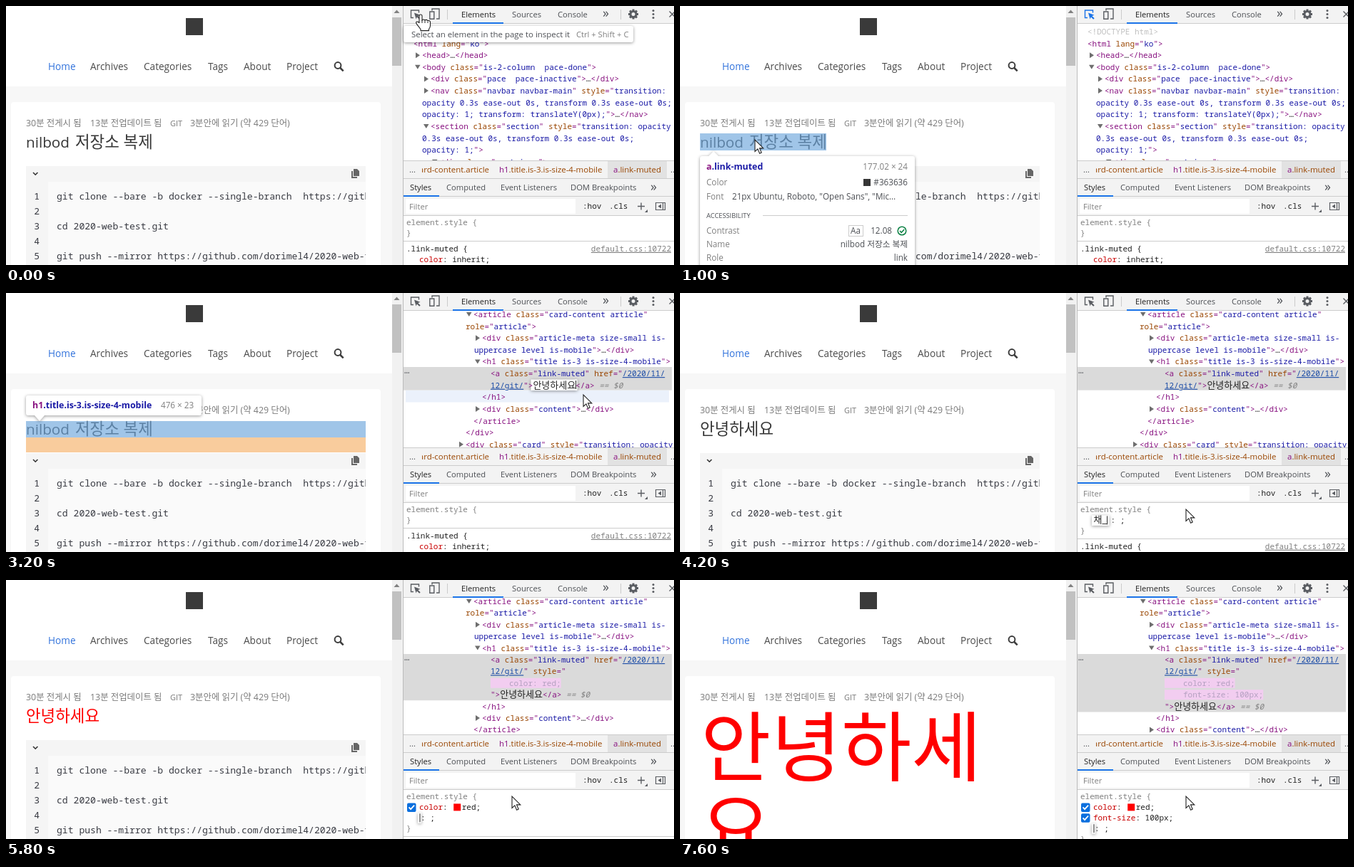
Write an HTML page that moves like this. It is 936 px wide and 364 px high and loops after 7800 ms.

```html
<!DOCTYPE html>
<html lang="ko">
<head>
<meta charset="utf-8">
<title>Inspecting and editing an element</title>
<style>
html, body { margin: 0; width: 100%; height: 100%; overflow: hidden; background: #fff; }
#stage { display: block; width: 936px; height: 364px; }
text { font: 11.2px 'Open Sans', 'Noto Sans CJK KR', 'Noto Sans CJK', sans-serif; fill: #4c4f54; white-space: pre; }
.nav { font-size: 13.6px; fill: #4a4a4a; }
.meta { font-size: 12.4px; fill: #7a7a7a; }
.title { font-size: 22.4px; fill: #363636; }
.latin { font-size: 20.7px; fill: #363636; }
.code { font: 13.08px 'Noto Sans Mono', 'DejaVu Sans Mono', monospace; fill: #383a42; }
.mono { font: 11px 'Noto Sans Mono', 'Noto Sans CJK KR', 'Noto Sans CJK', monospace; fill: #222; }
.crumb { font-size: 11.45px; }
.tip { font-size: 11.7px; }
.bold { font-size: 12.4px; font-weight: 700; }
.dim { fill: #808080; }
.end { text-anchor: end; }
.t { fill: #881280; } .a { fill: #994500; } .v { fill: #1a1aa6; } .x { fill: #222; }
.l { fill: #1a4ba6; text-decoration: underline; }
.g { fill: #808080; font-style: italic; }
.d { fill: #c0c0c0; }
.k { font-size: 13px; }
.p { fill: #b4a0c0; }
.r { fill: #c80000; }
.shadow { filter: drop-shadow(0 1px 2px rgba(0, 0, 0, .4)); }
</style>
</head>
<body>
<svg id="stage" viewBox="0 0 936 364"></svg>
<script>
const LOOP = 7800, STEP = 200;
const WHITE = '#fff', TINT = '#f7f7f7', BAR = '#f3f3f3', EDGE = '#ccc', INK = '#5a5d62', BLUE = '#1a73e8';
const BRAND = 'nilbod', TOPIC = '저장소 복제', HELLO = '안녕하세요';
const stage = document.getElementById('stage');

const esc = s => String(s).replace(/&/g, '&amp;').replace(/</g, '&lt;');
const text = (x, y, s, cls = '', extra = '') => `<text x="${x}" y="${y}" class="${cls}" ${extra}>${esc(s)}</text>`;
const rich = (x, y, html, cls) => `<text x="${x}" y="${y}" class="${cls}">${html}</text>`;
const span = (cls, s) => `<tspan class="${cls}">${esc(s)}</tspan>`;
const box = (x, y, w, h, fill, extra = '') => `<rect x="${x}" y="${y}" width="${w}" height="${h}" fill="${fill}" ${extra}/>`;
const fill = (d, color, extra = '') => `<path d="${d}" fill="${color}" ${extra}/>`;
const line = (d, color = INK, w = 1, extra = '') => `<path d="${d}" fill="none" stroke="${color}" stroke-width="${w}" ${extra}/>`;
const clip = (x, y, w, h, s) => `<svg x="${x}" y="${y}" width="${w}" height="${h}" viewBox="${x} ${y} ${w} ${h}">${s}</svg>`;
const wide = c => c.charCodeAt(0) > 0x1100 && c !== '…';
const monoWidth = s => [...s].reduce((w, c) => w + (wide(c) ? 12 : 6.6), 0);
const upTo = (list, step) => list.reduce((v, e) => e[0] <= step ? e[1] : v, null);

// Timeline, counted in 200 ms steps
const pointer = [[0, 581, 12], [1, 581, 12], [2, 380, 90], [3, 183, 164], [4, 140, 180], [5, 105, 188],
  [7, 105, 188], [8, 430, 160], [9, 770, 125], [10, 770, 125], [11, 809, 143], [16, 809, 143],
  [17, 760, 220], [18, 709, 304], [39, 709, 304]];
const hovers = [[0, ''], [3, 'card'], [5, 'link'], [7, ''], [9, 'row'], [11, 'h1'], [17, '']];
const edits = [[0, null], [19, ['']], [21, ['채_']], [22, ['c']], [23, ['color']], [24, ['color', '']],
  [25, ['color', 'red']], [27, ['']], [31, ['f']], [32, ['font']], [33, ['font-size']],
  [34, ['font-size', '']], [35, ['font-size', '1']], [36, ['font-size', '100']],
  [37, ['font-size', '100px']], [38, ['']]];

function stateAt(step) {
  const i = Math.max(1, pointer.findIndex(p => p[0] >= step));
  const [a, b] = [pointer[i - 1], pointer[i]];
  const u = (step - a[0]) / (b[0] - a[0]);
  const decls = [['color', 'red'], ['font-size', '100px']];
  return {
    step,
    x: a[1] + (b[1] - a[1]) * u,
    y: a[2] + (b[2] - a[2]) * u,
    hover: upTo(hovers, step),
    edit: upTo(edits, step),
    picking: step >= 1 && step < 7,
    found: step >= 7,
    typing: step >= 10 && step < 18,
    label: step < 11 ? `${BRAND} ${TOPIC}` : HELLO.slice(0, step - 11),
    renamed: step >= 18,
    live: decls.slice(0, step >= 37 ? 2 : step >= 25 ? 1 : 0),
    saved: decls.slice(0, step >= 38 ? 2 : step >= 27 ? 1 : 0)
  };
}

// Web page

function title(s) {
  const color = s.live.length ? 'style="fill:#f00"' : '';
  if (s.live.length > 1) {
    const big = 'style="fill:#f00;font-size:107px"';
    return text(29, 274, HELLO.slice(0, 4), '', big) + text(29, 389, HELLO[4], '', big);
  }
  return s.renamed ? text(28, 199, HELLO, 'title', color)
    : text(28, 199, BRAND, 'latin') + text(97, 199, TOPIC, 'title');
}

function codeBlock() {
  const url = 'https://github.com/dorimel4/2020-web-test.git';
  const rows = [`git clone --bare -b docker --single-branch  ${url}`, '', 'cd 2020-web-test.git', '', `git push --mirror ${url}`];
  return box(28, 225, 476, 140, '#f5f5f5') + box(59, 247, 445, 118, '#fafafa') +
    line('M38 234l3.2 3.2l3.2-3.2', '#333', 1.6) +
    fill('M487 229h5l3 3v7h-8zM484 232h2v8h6v2h-8z', '#666') +
    clip(28, 247, 476, 117, rows.map((r, i) =>
      text(47, 272 + 21 * i, i + 1, 'code end') + text(71, 272 + 21 * i, r, 'code')).join(''));
}

function page(s) {
  const nav = [[59, 'Home'], [118, 'Archives'], [193, 'Categories'], [283, 'Tags'], [333, 'About'], [393, 'Project']];
  return box(0, 0, 541, 114, WHITE) + box(0, 113, 541, 251, TINT) +
    box(252, 17, 24, 24, '#3a3a3a') +
    nav.map(([x, n], i) => text(x, 90, n, 'nav', i ? '' : 'style="fill:#3273dc"')).join('') +
    '<circle cx="465" cy="83.5" r="4.4" fill="none" stroke="#3c3c3c" stroke-width="2"/>' + line('M468.3 87l4.4 4.4', '#3c3c3c', 2.5) +
    box(7, 135, 518, 240, WHITE, 'rx="4"') +
    text(28, 169, '30분 전게시 됨', 'meta') + text(118, 169, '13분 전업데이트 됨', 'meta') +
    text(230, 169, 'GIT', 'meta', 'style="font-size:11px"') + text(258, 169, '3분안에 읽기 (약 429 단어)', 'meta') +
    (s.live.length > 1 ? '' : codeBlock()) + title(s) +
    box(541, 0, 15, 364, '#f1f1f1') + box(541, 16, 13, 68, '#c1c1c1') + fill('M543.5 10l4-4.5l4 4.5z', '#808080');
}

function smallTip(tag, rest, size, w, sizeX) {
  return fill(`M31 144h${w - 6}q3 0 3 3v22q0 3-3 3H54l-7 8l-7-8H31q-3 0-3-3v-22q0-3 3-3z`, WHITE, 'class="shadow"') +
    rich(37, 162, span('t', tag) + span('v', rest), 'bold') + text(sizeX, 162, size, 'tip dim');
}

function linkTip() {
  const label = (y, k) => text(37, y, k, 'tip dim');
  const value = (y, v) => text(319, y, v, 'tip end');
  return fill('M31 211h9l7-7l7 7h272q3 0 3 3v160H28V214q0-3 3-3z', WHITE, 'class="shadow"') +
    rich(37, 230, span('t', 'a') + span('v', '.link-muted'), 'bold') + text(319, 230, '177.02 × 24', 'tip dim end') +
    label(252, 'Color') + box(257, 243, 10, 10, '#363636') + value(252, '#363636') +
    label(272, 'Font') + text(73, 272, '21px Ubuntu, Roboto, "Open Sans", "Mic…', 'tip') +
    text(37, 298, 'ACCESSIBILITY', '', 'style="font-size:9.3px"') + line('M116 294.5H319', EDGE) +
    label(320, 'Contrast') + box(236.5, 308.5, 20, 15, 'none', `stroke="${EDGE}"`) + text(239, 320, 'Aa', 'tip') +
    text(297, 320, '12.08', 'tip end') +
    '<circle cx="311" cy="316" r="5.8" fill="none" stroke="#0b8043" stroke-width="1.5"/>' + line('M308 316l2.2 2.3l4-4.4', '#0b8043', 1.5) +
    label(339, 'Name') + value(339, `${BRAND} ${TOPIC}`) + label(358, 'Role') + value(358, 'link');
}

function highlight(kind) {
  const inner = 'rgba(111,168,220,.66)';
  const link = box(28, 179, 177, 24, inner);
  switch (kind) {
    case 'card': return fill('M7 135H525V364H504V155H28V364H7z', 'rgba(147,196,125,.55)') + box(28, 155, 476, 209, inner);
    case 'link': return link + linkTip();
    case 'row': return link + smallTip('a', '.link-muted', '177.02 × 24', 162, 118);
    case 'h1': return box(28, 180, 476, 23, inner) + box(28, 203, 476, 21, 'rgba(246,178,107,.66)') +
      smallTip('h1', '.title.is-3.is-size-4-mobile', '476 × 23', 246, 217);
  }
  return '';
}

// Element tree

function painter() {
  let quoted = false, inTag = false, naming = false, link = false;
  const kind = (c, before) => {
    if (quoted) {
      if (c !== '"') return link ? 'l' : 'v';
      quoted = false;
      return 't';
    }
    if (c === '<') { inTag = naming = true; return 't'; }
    if (c === '>') { inTag = false; return 't'; }
    if (!inTag) return /[=$0]/.test(c) ? 'g' : wide(c) ? 'x k' : 'x';
    if (c === '"') { quoted = true; link = before.endsWith('href='); return 't'; }
    if (c === ' ') naming = false;
    return naming || c === '=' ? 't' : 'a';
  };
  return s => {
    const runs = [];
    [...s].forEach((c, i) => {
      const k = kind(c, s.slice(0, i)), last = runs[runs.length - 1];
      if (last && last[0] === k) last[1] += c; else runs.push([k, c]);
    });
    return runs.map(r => span(...r)).join('');
  };
}

const headRows = [
  [571, '', ''], [571, '<html lang="ko">', ''], [583, '<head>…</head>', 'shut'],
  [583, '<body class="is-2-column  pace-done">', 'open'], [595, '<div class="pace  pace-inactive">…</div>', 'shut'],
  [595, '<nav class="navbar navbar-main" style="transition:', 'shut'],
  [583, 'opacity 0.3s ease-out 0s, transform 0.3s ease-out 0s;'],
  [583, 'opacity: 1; transform: translateY(0px);">…</nav>'],
  [595, '<section class="section" style="transition: opacity', 'open'],
  [583, '0.3s ease-out 0s, transform 0.3s ease-out 0s;'], [583, 'opacity: 1;">'],
  [607, '<div class="container">', 'open']];

function articleRows(s) {
  const tail = `">${s.label}</a> == $0`;
  const link = s.live.length
    ? [[679, '12/git/" style="'], ...s.live.map(d => [705, d.join(': ') + ';', 'pink']), [679, tail]]
    : [[679, '12/git/' + tail]];
  return [[655, '<article class="card-content article"', 'open'], [644, 'role="article">'],
    [667, '<div class="article-meta size-small is-', 'shut'], [656, 'uppercase level is-mobile">…</div>'],
    [667, '<h1 class="title is-3 is-size-4-mobile">', 'open'], [679, '<a class="link-muted" href="/2020/11/'],
    ...link, [667, '</h1>'], [667, '<div class="content">…</div>', 'shut'], [655, '</article>'], [644, '</div>'],
    [644, '<div class="card" style="transition: opacity', 'shut']];
}

function arrow(x, y, mark) {
  if (mark === 'open') return fill(`M${x - 10} ${y - 3}h7.5l-3.7 6z`, '#6e6e6e');
  return mark === 'shut' ? fill(`M${x - 9} ${y - 4}v8l6-4z`, '#6e6e6e') : '';
}

function tree(s) {
  const rows = s.found ? articleRows(s) : headRows;
  const top = s.found ? 30 : 36, pitch = s.live.length ? 16.4 : 16.62;
  const paint = painter();
  let out = box(557, 25, 379, 192, WHITE);
  if (s.found) {
    const n = s.live.length;
    out += box(557, 104, 376, (n ? n + 3 : 2) * 16.3, '#dadada') + text(558, 115, '•••', '', 'style="font-size:6.5px"');
    if (s.hover === 'h1') out += box(560, 137, 369, 16.5, '#ebf1fb');
    if (s.typing) {
      const w = monoWidth(s.label);
      out += box(735.5, 121.5, w + 5, 15.5, WHITE, 'class="shadow"');
      out += s.step === 10 ? box(738, 123, w, 13, '#b4d5fe') : line(`M${738.5 + w} 123v12`, '#222');
    }
  } else out += text(571, 40, '<!DOCTYPE html>', 'mono d');
  rows.forEach(([x, str, mark], i) => {
    const y = top + pitch * i;
    if (mark === 'pink') {
      out += box(679, y - 7, x - 679 + monoWidth(str), 14, '#f2cdf0') + text(x, y + 4, str, 'mono p');
    } else out += arrow(x, y, mark) + rich(x, y + 4, paint(str), 'mono');
  });
  return clip(557, 25, 379, 192, out);
}

// Style rules

function checkbox(y) {
  return box(562, y - 6, 12.5, 12.5, '#0b6fde', 'rx="2"') + line(`M564.5 ${y}l2.6 2.8l5-5.6`, '#fff', 1.8);
}

function declaration([name, value], y) {
  const isColor = name === 'color', x = 579 + monoWidth(name + ': ');
  return checkbox(y) + rich(579, y + 4, span('r', name) + ': ', 'mono') +
    (isColor ? box(x + 2, y - 5, 10, 10, '#f00') : '') + text(x + (isColor ? 13.5 : 0), y + 4, value + ';', 'mono');
}

function editor([name, value], y) {
  const field = (x, s) => {
    const w = monoWidth(s);
    return box(x - 2.5, y - 7, w + (w ? 6 : 5), 14.5, WHITE, 'class="shadow"') +
      rich(x, y + 4, [...s].map(c => span(wide(c) ? 'k' : '', c)).join(''), 'mono') + line(`M${x + w + .5} ${y - 6}v12`, '#222');
  };
  if (value === undefined) {
    const w = monoWidth(name);
    return field(579.5, name) + text(580 + w + (w ? 5 : 1), y + 4, ': ;', 'mono');
  }
  const x = 579 + monoWidth(name + ': ');
  return rich(579, y + 4, span('r', name) + ':', 'mono') + field(x, value) + text(x + monoWidth(value) + 4, y + 4, ';', 'mono');
}

function rules(s) {
  let y = 304.5, out = text(561, 308, 'element.style {', 'mono dim');
  const next = () => y += 14.9;
  s.saved.forEach(d => out += declaration(d, next()));
  if (s.edit) out += editor(s.edit, next());
  out += text(561, next() + 4, '}', 'mono dim');
  y += 11;
  out += line(`M557 ${Math.round(y) + .5}H936`, EDGE);
  y += 10.5;
  return out + text(561, y + 4, '.link-muted {', 'mono') +
    text(932, y + 4, 'default.css:10722', 'mono dim end', 'text-decoration="underline"') +
    rich(579, y + 19, span('r', 'color') + ': inherit;', 'mono');
}

// Developer panel frame

function toolbar(s) {
  const pick = s.picking ? BLUE : INK;
  const teeth = Array.from({ length: 8 }, (_, i) => box(-1.5, -7, 3, 4, INK, `transform="translate(879 11.5) rotate(${i * 45})"`)).join('');
  return box(557, 0, 379, 25, BAR) + line('M557 24.5H936', EDGE) +
    line('M571 16.5h-3.5v-10.5h11v3.5', pick, 1.4) + fill('M572 9.5l8.5 3.2l-3.2 1.2l3.4 3.4l-1.5 1.5l-3.4-3.4l-1.2 3z', pick) +
    line('M597 6.5v-2.5h10v14h-4M593.8 8h6v10.3h-6z', INK, 1.4) + line('M618.5 5v14M861.5 5v14', EDGE) +
    text(638, 16, 'Elements', '', 'style="fill:#222"') + text(709, 16, 'Sources') + text(773, 16, 'Console') +
    box(626, 23, 71, 2, BLUE) + text(836, 16, '»', '', 'style="font-size:18px"') +
    teeth + `<circle cx="879" cy="11.5" r="4" fill="none" stroke="${INK}" stroke-width="3"/>` +
    [6.5, 11.5, 16.5].map(y => `<circle cx="907" cy="${y}" r="1.5" fill="${INK}"/>`).join('') +
    line('M929.5 7.5l8 8m0-8l-8 8', INK, 1.4);
}

function panel(s) {
  return box(557, 217, 379, 147, WHITE) + box(557, 217, 379, 77, BAR) +
    line('M557 217.5H936M557 242.5H936M557 267.5H936M557 294.5H936', EDGE) +
    text(565, 234, '…', 'crumb') + clip(583, 218, 353, 24,
      box(843, 218, 83, 24, '#e2e2e2') + text(677, 234, 'card-content.article', 'crumb a end') +
      rich(691, 234, span('t', 'h1') + span('a', '.title.is-3.is-size-4-mobile'), 'crumb') +
      rich(851, 234, span('t', 'a') + span('a', '.link-muted'), 'crumb') + text(931, 234, '…', 'crumb')) +
    text(566, 259, 'Styles', '', 'style="fill:#222"') + text(617, 259, 'Computed') +
    text(693, 259, 'Event Listeners') + text(791, 259, 'DOM Breakpoints') +
    text(903, 260, '»', '', 'style="font-size:18px"') + box(557, 266, 50, 2, BLUE) +
    box(560, 271, 238, 21, WHITE) + text(565, 286, 'Filter', 'dim') +
    text(808, 285, ':hov', 'mono') + text(845, 285, '.cls', 'mono') +
    line('M885 281.5h10M890 276.5v10', INK, 1.4) + fill('M899 286v4h-4z', INK) +
    line('M910.5 276.5h13v10h-13zM920.5 276.5v10', INK, 1.2) + fill('M918 278.5v6l-4.5-3z', INK) +
    rules(s) + line('M556.5 0V364', '#bbb');
}

function hint() {
  return box(557, 28, 322, 23, WHITE, 'rx="3" class="shadow"') +
    text(568, 44, 'Select an element in the page to inspect it', 'crumb') + text(799, 44, 'Ctrl + Shift + C', 'dim');
}

function cursor(s) {
  const at = `transform="translate(${s.x} ${s.y})"`;
  const hand = 'M-2 2q0-2 2-2t2 2v6q2-2 4 0q2-1.4 4 .6q3-.6 3.5 2v5q0 3-2 5v2H0v-2l-6-8q-1-2.4 1-2.6t3 2z';
  const pointerShape = 'M0 0V16.5L3.9 12.9L6.6 19.2L9.2 18L6.5 11.9H11.8z';
  const pressing = s.step < 2;
  return fill(pressing ? hand : pointerShape, '#fff', `stroke="#222" stroke-width="1.1" ${at}`) +
    (pressing ? line('M2 8v4M6 8.5v3.5M10 9.5v2.5', '#222', 1, at) : '');
}

function draw(step) {
  const s = stateAt(step);
  stage.innerHTML = clip(0, 0, 556, 364, page(s) + highlight(s.hover)) +
    tree(s) + toolbar(s) + panel(s) + (step < 2 ? hint() : '') + cursor(s);
}

let shown = -1;
const start = performance.now();
function tick() {
  const step = Math.floor((performance.now() - start) % LOOP / STEP);
  if (step !== shown) draw(shown = step);
  requestAnimationFrame(tick);
}
tick();
</script>
</body>
</html>
```
